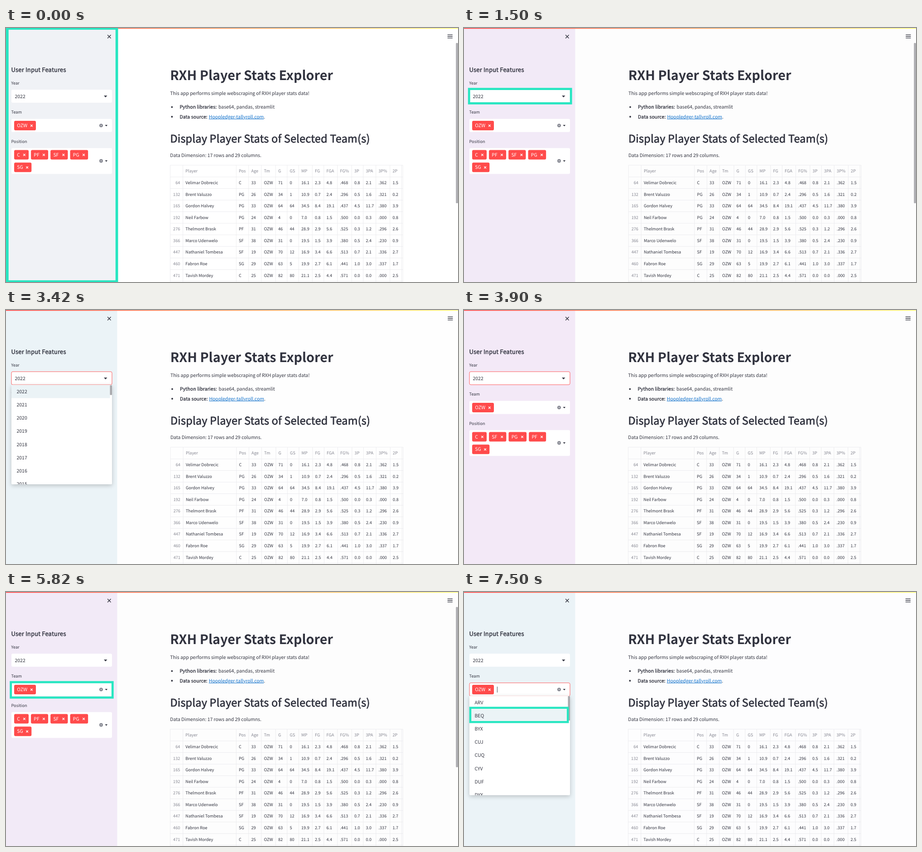
An HTML page that plays this animation: 998x561 px, repeating every 8000 ms.

```html
<!DOCTYPE html>
<html lang="en">
<head>
<meta charset="utf-8">
<title>Player Stats Explorer</title>
<style>
html, body { margin: 0; width: 100%; height: 100%; overflow: hidden; background: #fff; }
svg { display: block; }
text {
  font-family: "Noto Sans CJK JP", "Noto Sans CJK SC", "Noto Sans CJK KR", "Noto Sans CJK TC", "Noto Sans", sans-serif;
  fill: #31333f; text-rendering: geometricPrecision; white-space: pre;
}
.semi { stroke: #31333f; }
.mute { fill: #858691; }
.link { fill: #0f70cb; text-decoration: underline; }
.white { fill: #fff; }
.menu { filter: drop-shadow(0 3px 5px rgba(0, 0, 0, .2)); }
</style>
</head>
<body>
<svg id="stage" width="998" height="561" viewBox="0 0 998 561"></svg>
<script>
const INK = '#31333f', RED = '#ff4b4b', TEAL = '#27e6c1';
const BODY = 10.44, SMALL = 9.14, ROW = 25.57, ITEM = 29.2;

const text = (x, y, s, size = BODY, attr = '') =>
  `<text x="${x}" y="${y}" font-size="${size}" ${attr}>${s}</text>`;
const semi = (x, y, s, size, stroke, gap) =>
  text(x, y, s, size, `class="semi" stroke-width="${stroke}" letter-spacing="${gap}"`);
const rect = (x, y, w, h, fill, attr = '') =>
  `<rect x="${x}" y="${y}" width="${w}" height="${h}" fill="${fill}" ${attr}/>`;
const path = (d, color, w) => `<path d="${d}" fill="none" stroke="${color}" stroke-width="${w}"/>`;
const cross = (x, y, r, color, w) =>
  path(`M${x - r} ${y - r}l${2 * r} ${2 * r}m0 ${-2 * r}l${-2 * r} ${2 * r}`, color, w);
const caret = (x, y, r) => `<path d="M${x - r} ${y - r / 2}h${2 * r}l${-r} ${r * 1.1}z" fill="${INK}"/>`;
const group = (id, body, attr = '') => `<g id="${id}" ${attr}>${body}</g>`;

const clear = y => `<circle cx="210" cy="${y}" r="3.9" fill="#83858f"/>` +
  cross(210, y, 1.3, '#fff', .9) + caret(221.4, y + .2, 2.8);

const chip = (x, y, w, s) => rect(x, y, w, 21, RED, 'rx="2.9"') +
  text(x + 6.2, y + 14.2, s, BODY, 'class="white"') + cross(x + w - 9.6, y + 10.7, 2.3, '#fff', 1.3);

const chips = names => {
  const width = { C: 32, PF: 38, SF: 38.3, PG: 39.6, SG: 38.3 };
  let x = 18;
  return names.map((n, i) => {
    if (i === 4) x = 18;
    const out = chip(x, i < 4 ? 269.5 : 297.2, width[n], n);
    x += width[n] + 5.1;
    return out;
  }).join('');
};

const menu = (id, y, names, thumb) => group(id,
  rect(12, y, 222, 219.5, '#fff', 'class="menu" rx="2"') +
  `<svg x="12" y="${y}" width="222" height="219.5">` +
  rect(0, 0, 217.5, ITEM, '#ebf3f6', `id="${id}Hot"`) +
  names.map((n, i) => text(11.5, 18.4 + i * ITEM, n)).join('') +
  rect(217.5, .8, 4.5, thumb, '#a9a9ad', 'rx="1"') + '</svg>');

const cols = [396.3, 514, 541.5, 569.5, 601, 626.5, 652, 682, 707.5, 737.5, 769, 794.5, 822.5, 853.5];
const heads = 'Player|Pos|Age|Tm|G|GS|MP|FG|FGA|FG%|3P|3PA|3P%|2P'.split('|');
const players = `64|Velimar Dobrecic|C|33|71|0|16.1|2.3|4.8|.468|0.8|2.1|.362|1.5
132|Brent Valuzzo|PG|26|34|1|10.9|0.7|2.4|.296|0.5|1.6|.321|0.2
165|Gordon Halvey|PG|33|64|64|34.5|8.4|19.1|.437|4.5|11.7|.380|3.9
192|Neil Farbow|PG|24|4|0|7.0|0.8|1.5|.500|0.0|0.3|.000|0.8
276|Thelmont Brask|PF|31|46|44|28.9|2.9|5.6|.525|0.3|1.2|.296|2.6
366|Marco Udenwelo|SF|38|31|0|19.5|1.5|3.9|.380|0.5|2.4|.230|0.9
447|Nathaniel Tombesa|SF|19|70|12|16.9|3.4|6.6|.513|0.7|2.1|.336|2.7
460|Fabron Roe|SG|29|63|5|19.9|2.7|6.1|.441|1.0|3.0|.337|1.7
471|Tavish Mordey|C|25|82|80|21.1|2.5|4.4|.571|0.0|0.0|.000|2.5`.split('\n').map(r => r.split('|'));

function table() {
  let grid = 'M362.6 303H876.3M362.6 561V303M390.6 561V303M876.3 561V303M873.6 561V303';
  for (const x of cols.slice(1)) grid += `M${x - 5.7} 561V303`;
  for (let i = 0; i <= players.length; i++) grid += `M362.6 ${329 + i * ROW}H876.3`;
  let out = path(grid, '#e7e7eb', .75);
  heads.forEach((h, i) => out += text(cols[i], 319.3, h, SMALL, 'class="mute"'));
  players.forEach(([id, ...cells], r) => {
    const y = 345 + r * ROW;
    cells.splice(3, 0, 'OZW');
    out += text(384.3, y, id, SMALL, 'class="mute" text-anchor="end"');
    cells.forEach((c, i) => out += text(cols[i], y, c, SMALL));
  });
  return out;
}

const main =
  text(362.2, 115, 'RXH Player Stats Explorer', 28.74, 'font-weight="700"') +
  text(362.3, 148.2, 'This app performs simple webscraping of RXH player stats data!') +
  [174.6, 196].map(y => `<circle cx="366.4" cy="${y}" r="1.9" fill="${INK}"/>`).join('') +
  semi(383.4, 178.2, 'Python libraries:', BODY, .35, .12) +
  text(469, 178.2, 'base64, pandas, streamlit') +
  semi(383.4, 199.5, 'Data source:', BODY, .35, .12) +
  text(447.8, 199.5, '<tspan class="link">Hoopledger-tallyroll.com</tspan>.') +
  semi(362.4, 253.4, 'Display Player Stats of Selected Team(s)', 23.5, .7, .2) +
  text(362.3, 285, 'Data Dimension: 17 rows and 29 columns.') +
  table() +
  path('M974.8 14.9h11.2m0 3.6h-11.2m0 3.6h11.2', INK, 1.4);

const field = (id, y, h) => rect(12, y, 222, h, '#fff', `id="${id}" rx="2.9" stroke-width=".9"`);
const side =
  cross(227.9, 19, 3.7, INK, 1.4) +
  semi(11.6, 97, 'User Input Features', 13.06, .45, .13) +
  text(11.6, 125, 'Year', SMALL) +
  field('year', 136.2, 28.8) + text(19.5, 154.8, '2022') + caret(219.8, 151, 3.7) +
  text(11.6, 189.3, 'Team', SMALL) +
  field('team', 200.7, 29) + chip(18, 205, 48, 'OZW') + clear(215.3) +
  text(11.6, 254.2, 'Position', SMALL) +
  field('pos', 265.2, 57) + clear(293.5) +
  group('order0', chips(['C', 'PF', 'SF', 'PG', 'SG'])) +
  group('order1', chips(['C', 'SF', 'PG', 'PF', 'SG'])) +
  group('typing', path('M73.4 209v13', INK, .9));

const years = Array.from({ length: 8 }, (_, i) => 2022 - i);
const teams = ['ARV', 'BEQ', 'BYX', 'CUJ', 'CUQ', 'CYV', 'DUF', 'DYX'];

const stage = document.getElementById('stage');
stage.innerHTML =
  '<defs><linearGradient id="fade"><stop stop-color="#ff4b4b"/><stop offset="1" stop-color="#fffd80"/></linearGradient></defs>' +
  rect(0, 0, 998, 561, '#fff', 'id="page"') +
  group('main', main) +
  rect(993.4, 33, 4.6, 354, '#aeaeb2', 'id="scroll" rx="1.5"') +
  rect(0, 0, 245.5, 561, '#fff', 'id="side"') +
  rect(0, 0, 998, 1.7, 'url(#fade)') + side +
  menu('years', 165.4, years, 21.5) + menu('teams', 229.3, teams, 54) +
  `<path id="ring" fill="${TEAL}" fill-rule="evenodd"/>`;

const el = id => document.getElementById(id);
const show = (id, on) => el(id).setAttribute('display', on ? 'inline' : 'none');

// outer box x, y, right, bottom, then side and top/bottom thickness
const rings = {
  side: [0, 0, 247.5, 561, 5.7, 3.8],
  year: [8.8, 132.2, 238.6, 168.8, 4.8, 4.8],
  team: [8.3, 196.8, 237.7, 235.6, 4.8, 4.8],
  item: [11.7, 253.6, 231.5, 289.6, 4.5, 4.5]
};
const ringPath = ([x, y, r, b, p, q]) =>
  `M${x} ${y}H${r}V${b}H${x}zM${x + p} ${y + q}H${r - p}V${b - q}H${x + p}z`;

const steps = [
  { at: 0, side: '#f0f2f6', page: '#ffffff', ring: 'side', scroll: 1 },
  { at: 1500, side: '#f2eaf7', page: '#fdfdfd', ring: 'year', scroll: 1, shift: .6 },
  { at: 2700, side: '#ebf3f7', page: '#fefefe', focus: 'year', menu: 'years', shift: .6 },
  { at: 3900, side: '#f3e9f7', page: '#fdfdfd', focus: 'year', swap: 1 },
  { at: 5100, side: '#f2eaf7', page: '#fdfdfd', ring: 'team', scroll: 1 },
  { at: 6300, side: '#ebf3f7', page: '#fdfdfe', focus: 'team', menu: 'teams', shift: .6 },
  { at: 7500, side: '#ebf3f7', page: '#fdfdfe', focus: 'team', menu: 'teams', ring: 'item', hot: 1 }
];

function draw(s) {
  el('side').setAttribute('fill', s.side);
  el('page').setAttribute('fill', s.page);
  el('main').setAttribute('transform', `translate(${s.shift || 0} 0)`);
  el('ring').setAttribute('d', s.ring ? ringPath(rings[s.ring]) : '');
  for (const id of ['year', 'team']) el(id).setAttribute('stroke', s.focus === id ? RED : 'none');
  for (const id of ['years', 'teams']) show(id, s.menu === id);
  el('teamsHot').setAttribute('y', s.hot ? ITEM : 0);
  show('typing', s.focus === 'team');
  show('scroll', s.scroll);
  show('order0', !s.swap);
  show('order1', s.swap);
}

let current;
function tick() {
  const t = performance.now() % 8000;
  const step = steps.filter(s => s.at <= t).pop();
  if (step !== current) draw(current = step);
  requestAnimationFrame(tick);
}
tick();
</script>
</body>
</html>
```
